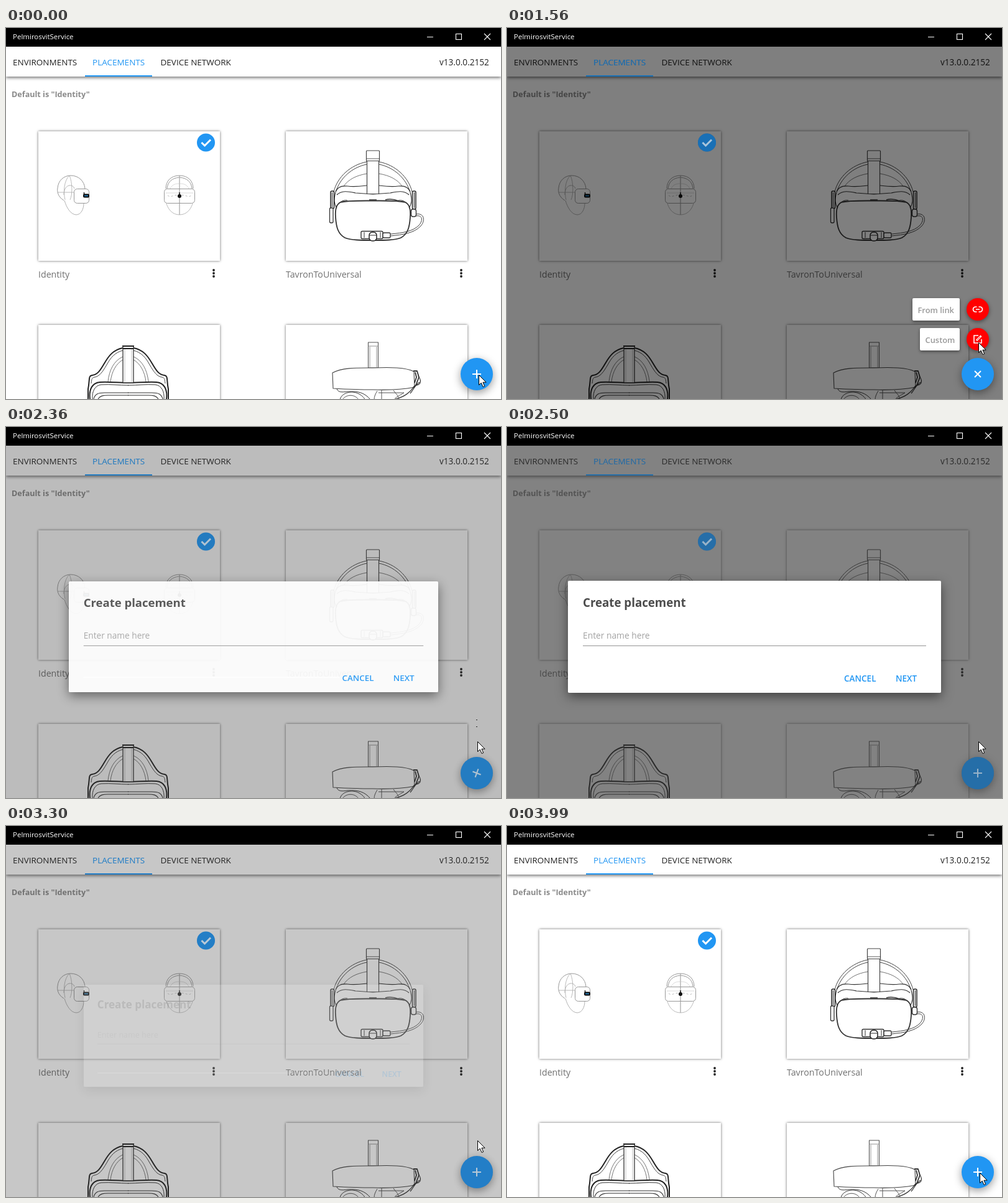
An HTML page with a canvas that plays this animation: 796 px wide and 596 px high, repeating every 4580 ms.

```html
<!DOCTYPE html>
<html lang="en">
<head>
<meta charset="utf-8">
<title>Placements</title>
<style>
  html, body { margin: 0; width: 100%; height: 100%; overflow: hidden; background: #fff; }
  canvas { display: block; }
</style>
</head>
<body>
<canvas id="stage" width="796" height="596"></canvas>
<script>
const c = document.getElementById('stage').getContext('2d');
const LOOP = 4580, BLUE = '#2196f3', SANS = '"Open Sans", "Noto Sans", sans-serif';

// [first, last, count]: moments at which the screen refreshes
const refreshes = [[130, 330, 3], [730, 1220, 8], [1290, 1360, 2], [1560, 1560, 1],
  [2290, 2500, 4], [3230, 3720, 8], [3790, 3990, 3]];

const tracks = {
  menu: [[130, 0], [230, .75], [330, 1], [2290, 1], [2420, 0]],
  shade: [[2290, 0], [2360, .32], [2430, .53], [2500, .6], [3230, .6], [3300, .265], [3370, .06], [3440, 0]],
  alpha: [[2290, 0], [2360, .93], [2430, 1], [3230, 1], [3300, .16], [3370, 0]],
  scale: [[2290, .9], [2360, .99], [2430, 1], [3230, 1], [3300, .91], [3370, .9]],
  cursor: [[660, 557], [800, 552], [1220, 515], [1360, 506], [1560, 505],
    [3370, 505], [3720, 548], [3990, 557]]
};

function snap(t) {
  let last = 0;
  for (const [from, to, n] of refreshes) {
    for (let i = 0; i < n; i++) {
      const at = n > 1 ? from + (to - from) * i / (n - 1) : from;
      if (at <= t + .01) last = at;
    }
  }
  return last;
}

function value(name, t) {
  const keys = tracks[name];
  if (t <= keys[0][0]) return keys[0][1];
  for (let i = 1; i < keys.length; i++) {
    const [t0, a] = keys[i - 1], [t1, b] = keys[i];
    if (t <= t1) return a + (b - a) * (t - t0) / (t1 - t0);
  }
  return keys[keys.length - 1][1];
}

function text(s, x, y, size, color, weight = 400) {
  c.font = `${weight} ${size}px ${SANS}`;
  c.fillStyle = color;
  c.fillText(s, x, y);
}

function rect(x, y, w, h, color) {
  c.fillStyle = color;
  c.fillRect(x, y, w, h);
}

function disc(x, y, r, color) {
  c.fillStyle = color;
  c.beginPath();
  c.arc(x, y, r, 0, 7);
  c.fill();
}

function line(d, width = 1, color = '#333', fill) {
  const p = new Path2D(d);
  if (fill) { c.fillStyle = fill; c.fill(p); }
  c.lineWidth = width;
  c.strokeStyle = color;
  c.stroke(p);
}

function panel(x, y, w, h, r, fill) {
  c.beginPath();
  c.roundRect(x, y, w, h, r);
  c.fillStyle = fill;
  c.fill();
}

function box(x, y, w, h, r, width = 1, color = '#333', fill = 'transparent') {
  panel(x, y, w, h, r, fill);
  c.lineWidth = width;
  c.strokeStyle = color;
  c.stroke();
}

function shadow(blur, dy, alpha, draw) {
  c.save();
  c.shadowColor = `rgba(0,0,0,${alpha})`;
  c.shadowBlur = blur;
  c.shadowOffsetY = dy;
  draw();
  c.restore();
}

function mirrored(axis, draw) {
  draw();
  c.save();
  c.translate(2 * axis, 0);
  c.scale(-1, 1);
  draw();
  c.restore();
}

function titleBar() {
  rect(0, 0, 796, 30, '#000');
  text('PelmirosvitService', 11, 18, 11.5, '#fff');
  line('M677 14.5H687M769 9L779 19M779 9L769 19', 1.1, '#fff');
  c.strokeRect(723.5, 9.5, 9, 9);
}

function heads() {
  const grey = '#aaa';
  // side view
  line('M93 277C83 271 82 262 83 257C84 245 93 237 104 237C117 237 126 246 127 258', 1, '#999');
  line('M102 237C107 248 107 268 103 276M102 237C93 245 92 264 95 276M83 264H109', .8, grey);
  line('M93 268C93 250 108 250 110 258M94 277C97 288 104 300 113 300C121 300 125 290 125 282', .9, grey);
  box(109.5, 258.5, 24, 23, 5, 1, '#999');
  line('M125.5 264V272', 1.4, '#111');
  box(125, 267.5, 8, 4, 1, 1.8, '#000', '#2b7fb5');
  // front view
  mirrored(279, () => {
    line('M279 237C265 237 257 246 257 258M279 240C267 241 260 247 259 258', 1, '#999');
    line('M279 237V300M258 282C261 292 268 300 279 300', .8, grey);
    line('M257 265H279M264 258C267 252 271 250 279 250', .7, '#ccc');
  });
  box(254.5, 258.5, 49, 23, 5, 1, '#999');
  c.setLineDash([3, 3]);
  line('M260 269C266 274 272 265 279 270C286 265 292 274 298 269', 1, '#bbb');
  c.setLineDash([]);
  line('M279 264V270', 1.4, '#111');
  disc(279, 270, 3, '#111');
}

function roundHeadset() {
  mirrored(590, () => {
    line('M527 263C533 239 554 220 580 215M530 264C537 241 556 224 580 219', 1, '#444');
    line('M543 254C551 243 563 237 580 234', .9, '#666');
    line('M530 263C533 255 540 253 549 254C565 256 576 253 590 252M532 268C540 260 552 263 562 265L590 267', 1.2);
    line('M530 264C527 275 527 282 532 289M536 281C541 277 544 276 549 277', 1.1);
    line('M590 277.5C569 277.5 548 277 538 280C531 283 529 291 530 304C531 320 534 331 545 337C555 341 571 341 590 341', 1.8);
  });
  line('M584 276H596M610 276C617 274 624 275 632 278', 1.5);
  box(579.5, 197, 21, 17, 1, 1.2, '#444', '#fff');
  box(580.5, 213.5, 19, 53, 0, 1.2, '#444', '#fff');
  line('M580 210H601', .8);
  box(522, 262, 5.5, 28, 2, 1.5, '#222', '#fff');
  box(520.5, 289, 5.5, 24, 2, 1.3, '#333', '#fff');
  line('M524.5 264V288', 1.2);
  box(653.5, 262, 5.5, 29, 2, 1.5, '#222', '#fff');
  line('M656.5 264V289', 1.2);
  box(651.5, 291, 8, 12, 3, 1.4, '#333', '#fff');
  line('M660 299C672 297 675 309 667 318C656 330 637 332 619 334M659 302C670 300 671 309 664 317C654 327 638 329 619 331', 1, '#444');
  box(571, 326.5, 35, 12, 2, 1.4, '#333', '#fff');
  box(606, 329, 12, 8, 2, 1.4, '#333', '#fff');
  box(584, 328, 12, 14, 5, 1.5, '#222', '#fff');
  line('M584 333H596M576 328V337M602 328V337', 1);
}

function strapHeadset() {
  mirrored(196.5, () => {
    line('M188 514C172 517 165 527 158 539C151 551 147 557 138 558C132 559 135 566 132 580V597', 2, '#222');
    line('M188 518C175 521 168 530 162 541C155 553 150 560 142 561C137 562 138 566 137 571', 1, '#444');
    line('M164 568C166 549 174 534 188 528M168 568C170 552 177 539 188 533', .9, '#666');
    line('M135 596C133 580 139 570 151 569C166 568 180 570 197 570', 2, '#222');
    line('M139 596C138 584 143 574 153 573C169 572 181 574 197 574', 1);
    line('M141 596C143 588 148 586 158 586H197M148 596C151 591 156 590 164 590H197', 1.1);
  });
  box(188, 511, 17, 59, 0, 1.3, '#333', '#fff');
  line('M187 511H206M188 515H205', 2, '#222');
  line('M191 516V569M202 516V569', .6, '#999');
}

function bandHeadset() {
  box(582.5, 505, 16, 41, 0, 1.1, '#555', '#fff');
  line('M582 511H599M585 512V545M596 512V545', .8, '#777');
  line('M525 554C542 545 566 546 590 546C618 545 643 545 656 552L657 577C636 581 613 582 590 581C565 581 544 580 526 579Z', 1.1, '#444', '#fff');
  line('M655 551L661 551L664 561L659 574L655 577M658 553L660 561L657 570', 1.8);
  line('M663 559C668 566 668 572 660 574C654 576 654 581 647 586C642 591 631 595 624 597M665 569C657 574 655 582 650 587', 1.2);
  line('M532 580C535 586 541 585 550 584C566 583 577 586 586 597M537 597C540 585 557 582 568 588C573 591 576 594 577 597', 1);
  line('M541 597C547 588 561 588 567 597M597 583C594 588 592 592 592 597M599 586H640C632 591 628 592 624 597M604 582V597M623 582C627 588 631 590 632 597', 1, '#555');
}

function card(x, y, label, art) {
  shadow(4, 0, .6, () => rect(x, y, 292, 208, '#fff'));
  c.save();
  c.lineJoin = 'round';
  art();
  c.restore();
  if (!label) return;
  text(label, x, y + 235, 14.2, '#707070');
  for (const dy of [223, 228, 233]) disc(x + 282, y + dy, 1.9, '#222');
}

function accents() {
  text('PLACEMENTS', 139, 60, 13.5, BLUE);
  rect(127, 76, 108, 2, BLUE);
  disc(321.5, 184, 14.5, BLUE);
  line('M314.5 184L319.5 189L329 179.5', 3, '#fff');
}

function page() {
  rect(0, 30, 796, 566, '#fff');
  shadow(5, 2, .55, () => rect(0, 30, 796, 48, '#fff'));
  text('ENVIRONMENTS', 11, 60, 13.5, '#222');
  text('DEVICE NETWORK', 248.5, 60, 13.5, '#222');
  text('v13.0.0.2152', 697, 60, 13.6, '#222');
  text('Default is "Identity"', 9, 111, 12.6, '#8a8a8a', 700);
  card(52, 166, 'Identity', heads);
  card(450, 166, 'TavronToUniversal', roundHeadset);
  card(52, 477, '', strapHeadset);
  card(450, 477, '', bandHeadset);
  accents();
}

// Blue parts keep some of their brightness under the veil.
function veil(rgb, alpha, keep, bright) {
  if (alpha <= 0) return;
  rect(0, 30, 796, 566, `rgba(${rgb},${alpha})`);
  c.save();
  c.globalAlpha = keep;
  bright();
  c.restore();
}

function plus(turn) {
  c.save();
  c.translate(757, 556);
  c.rotate(turn * Math.PI / 4);
  line('M-7 0H7M0 -7V7', 2, '#fff');
  c.restore();
}

function addButton(turn) {
  shadow(14, 4, .4, () => disc(757, 556, 26, BLUE));
  plus(turn);
}

function linkIcon() {
  line('M-1.5 -4H-3.5A4 4 0 0 0 -3.5 4H-1.5M1.5 -4H3.5A4 4 0 0 1 3.5 4H1.5M-3 0H3', 1.7, '#fff');
}

function editIcon() {
  line('M1 -6H-6V6H6V0', 1.6, '#fff');
  line('M-2 2L5.5 -5.5', 3, '#fff');
  line('M-1.2 1.2L4 -4', .9, '#f00');
}

function menuItem(y, x, label, icon, show) {
  c.save();
  c.globalAlpha = show;
  shadow(5, 2, .45, () => panel(x, y - 18, 728 - x, 36, 2, '#fff'));
  text(label, x + 8.5, y + 6, 12.9, '#999', 600);
  c.translate(757, y);
  c.scale(show, show);
  shadow(7, 2, .45, () => disc(0, 0, 18, '#f00'));
  icon();
  c.restore();
}

function dialog(alpha, scale) {
  if (alpha <= 0) return;
  c.save();
  c.globalAlpha = alpha;
  c.translate(398, 337);
  c.scale(scale, scale);
  c.translate(-300, -90);
  // the shadow stays outside, so it never shows through the fading panel
  c.save();
  c.beginPath();
  c.rect(-60, -60, 720, 300);
  c.rect(0, 0, 600, 180);
  c.clip('evenodd');
  shadow(18, 6, .5, () => panel(0, 0, 600, 180, 2, '#fff'));
  c.restore();
  panel(0, 0, 600, 180, 2, '#fff');
  text('Create placement', 24, 42, 18.7, '#4c4c4c', 700);
  text('Enter name here', 24, 93, 13.8, '#a2a2a2');
  rect(24, 104, 552, 1, '#949494');
  rect(24, 155, 416, 1.5, '#fff');
  text('CANCEL', 444, 162, 13.5, BLUE, 600);
  text('NEXT', 527, 162, 13.5, BLUE, 600);
  c.restore();
}

function pointer(x, y) {
  c.save();
  c.translate(x + .5, y + .5);
  line('M0 0V16L3.7 12.6L6.6 19L9.2 17.9L6.4 11.7H11.6Z', 1, '#000', '#fff');
  c.restore();
}

function draw(time) {
  const t = snap(time);
  const menu = value('menu', t), show = Math.max(0, 2 * menu - 1);
  const shade = value('shade', t);
  const y = value('cursor', t), x = 758 + (y - 505) / 26;

  page();
  veil('0,0,0', .5 * show, .5 * show, accents);
  addButton(menu);
  if (show > 0) {
    menuItem(452, 652, 'From link', linkIcon, show);
    menuItem(500, 664, 'Custom', editIcon, show);
  } else if (menu > 0) {
    rect(756, 470, 2, 1, '#222');
    rect(756, 481, 2, 1, '#222');
  }
  veil('48,48,48', shade, .6 * shade, () => {
    accents();
    disc(757, 556, 26, BLUE);
    plus(menu);
  });
  dialog(value('alpha', t), value('scale', t));
  titleBar();
  if ([130, 2290, 3230].includes(t)) disc(x, y, 12, 'rgba(255,255,0,.5)');
  pointer(Math.round(x), Math.round(y));
}

const start = performance.now();
function tick() {
  draw((performance.now() - start) % LOOP);
  requestAnimationFrame(tick);
}
tick();
</script>
</body>
</html>
```
